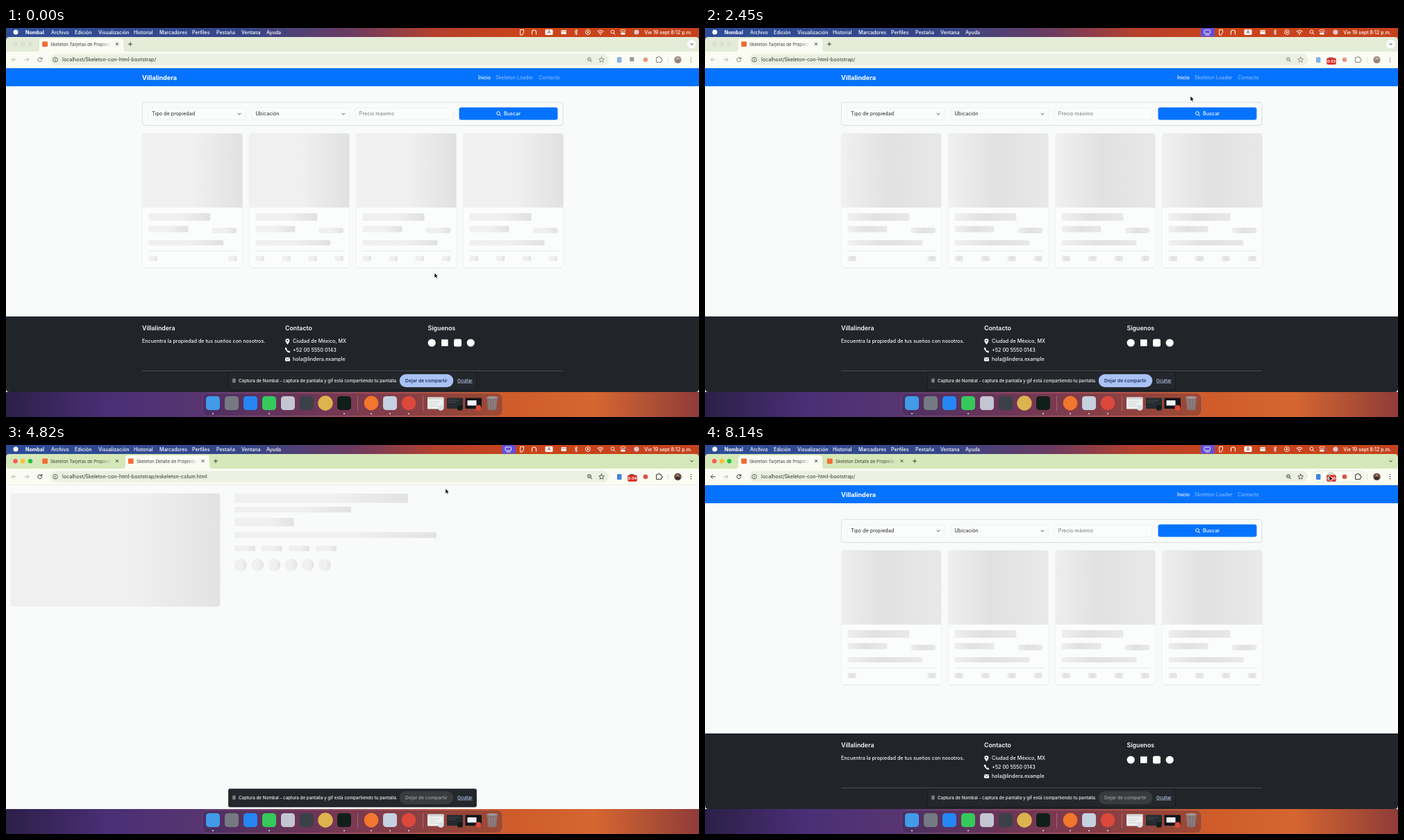
An HTML page that plays this animation: 998x561 px, repeating every 8240 ms.

```html
<!DOCTYPE html>
<html lang="es">
<head>
<meta charset="utf-8">
<title>Skeleton Tarjetas</title>
<style>
html, body { margin: 0; width: 100%; height: 100%; overflow: hidden; background: #212529 }
svg { display: block; width: 998px; height: 561px; font-family: Inter, "Liberation Sans", sans-serif }
text { white-space: pre }
</style>
</head>
<body>
<svg id="stage" viewBox="0 0 998 561" xmlns="http://www.w3.org/2000/svg"></svg>
<script>
const LOOP = 8240, BRAND = 'Villalindera', BROWSER = 'Nombal';
const ORANGE = '#f26c32', INK = '#24282c', BLUE = '#0573ff';

// Markup helpers
const rect = (x, y, w, h, fill, r = 0, more = '') =>
  `<rect x="${x}" y="${y}" width="${w}" height="${h}" rx="${r}" fill="${fill}" ${more}/>`;
const disc = (x, y, r, fill, more = '') => `<circle cx="${x}" cy="${y}" r="${r}" fill="${fill}" ${more}/>`;
const line = (d, color, w = 1, more = '') =>
  `<path d="${d}" fill="none" stroke="${color}" stroke-width="${w}" stroke-linecap="round" stroke-linejoin="round" ${more}/>`;
const text = (x, y, s, size, fill, weight = 400, more = '') =>
  `<text x="${x}" y="${y}" font-size="${size}" fill="${fill}" font-weight="${weight}" ${more}>${s}</text>`;
const group = (id, ...parts) => `<g id="${id}">${parts.join('')}</g>`;
const each = (list, f) => list.map(f).join('');
const range = n => [...Array(n).keys()];
const gradient = (id, stops, more = '') => `<linearGradient id="${id}" ${more}>` +
  each(stops, ([o, c, a = 1]) => `<stop offset="${o}" stop-color="${c}" stop-opacity="${a}"/>`) + '</linearGradient>';
const bone = (x, y, w, h, r = 2) => rect(x, y, w, h, 'url(#shimmer)', r);
const lens = (x, y, color) => disc(x, y, 2.4, 'none', `stroke="${color}" stroke-width=".9"`) +
  line(`M${x + 1.8} ${y + 1.8}l2 2`, color, .9);
const cross = x => line(`M${x - 1.7} 21.4l3.4 3.4m0-3.4l-3.4 3.4`, '#333', .9);
const plus = x => line(`M${x - 2.5} 23.2h5m-2.5-2.5v5`, '#333', .9);

const defs = '<defs>' +
  gradient('shimmer', [[.25, '#f0f0f0'], [.37, '#e0e1e0'], [.63, '#f0f0f0']], 'x1="0" x2="4" y1="0" y2="0"') +
  gradient('fade', [[.84, '#3b3f38'], [1, '#3b3f38', .1]]) +
  gradient('menu', [[0, '#2d4d98'], [.35, '#364688'], [.5, '#6c3b60'], [.62, '#b4402d'], [.75, '#cb4419'], [1, '#c4421d']]) +
  gradient('desk', [[0, '#2b2048'], [.15, '#4a2f76'], [.28, '#583570'], [.5, '#9a4453'],
    [.7, '#cd5a29'], [.85, '#d56630'], [1, '#8f3c3a']]) +
  '</defs>';

function menuBar() {
  const names = [['Archivo', 65], ['Edición', 99], ['Visualización', 133], ['Historial', 184], ['Marcadores', 221],
    ['Perfiles', 268], ['Pestaña', 303], ['Ventana', 339], ['Ayuda', 375]];
  const w = '#fff';
  return rect(0, 0, 998, 20, 'url(#menu)') + disc(14, 6, 3.5, w) + text(28, 8.5, BROWSER, 7.1, w, 700) +
    each(names, ([s, x]) => text(x, 8.5, s, 7, w, 500)) +
    group('rec', rect(714, 0, 20, 12.5, '#6250d8', 2),
      rect(719, 3, 8.5, 5, 'none', .8, 'stroke="#fff" stroke-width=".9"'), line('M721 10h5', w, .9), disc(895.5, 6, 1, '#8b5cf6')) +
    line('M741 2.5h4.5v4l-2 3.5h-2.5z', w) +
    line('M757.5 8V6a3 3 0 0 1 6 0v2m-6-1v2m6-2v2', w, 1.1) +
    rect(776.5, 2, 11, 8, w, 1.5) + text(782, 8.4, 'A', 6.3, '#9c4630', 600, 'text-anchor="middle"') +
    rect(799.5, 3, 7.5, 6, w, .8) + line('M800 5h6.5', '#b4402d', .7) +
    line('M819 4l4 4-2 2V2l2 2-4 4', w, .8) +
    disc(838, 6, 3.4, 'none', 'stroke="#fff" stroke-width=".9"') + '<path d="M837 4.3v3.4l2.8-1.7z" fill="#fff"/>' +
    line('M852.3 5a5.5 5.5 0 0 1 7.6 0m-6 2a3.2 3.2 0 0 1 4.4 0', w, 1.1) + disc(856.1, 9, .9, w) +
    lens(873.5, 5.5, w) +
    rect(885, 2.5, 7, 2.8, 'none', 1.4, 'stroke="#fff" stroke-width=".8"') + rect(885, 6.7, 7, 2.8, w, 1.4) +
    disc(908, 6, 3.6, '#e3c5d0') +
    text(988, 8.5, 'Vie 19 sept 8:12 p.m.', 7, w, 500, 'text-anchor="end"');
}

const tabShape = (id, x) => group(id,
  `<path d="M${x - 4} 34q4 0 4-4V19q0-4 4-4h113q4 0 4 4v11q0 4 4 4z" fill="#fafcf3"/>`);
const tabText = (x, title) => text(x, 25.6, title, 6.3, 'url(#fade)');

function browser() {
  const soft = '#535950';
  return '<path id="strip" d="M0 34V18q0-5 5-5H993q5 0 5 5V34z"/>' +
    group('lights', each([13.5, 24.3, 35], (x, i) => disc(x, 23.2, 3.2, ['#fb5a52', '#fdbc2e', '#29c440'][i]))) +
    group('dimLights', each([13.5, 24.3, 35], x => disc(x, 23.2, 3.1, '#dde2d4', 'stroke="#cfd5c6" stroke-width=".5"'))) +
    tabShape('front1', 48) + rect(52.2, 19.5, 7.8, 7.6, ORANGE, 1) +
    tabText(64, 'Skeleton Tarjetas de Propied') + cross(160) +
    group('plus1', plus(179)) +
    group('tab2', tabShape('front2', 172), group('icon2', rect(175.8, 19.5, 7.8, 7.6, ORANGE, 1)),
      group('wait2', disc(179.7, 23.2, 2.3, 'none', 'stroke="#a3aa9a" stroke-width="1"')),
      tabText(188, 'Skeleton Detalle de Propieda'), cross(283.5), plus(302)) +
    disc(987.5, 23.2, 6.2, '#fff', 'id="round"') + line('M985.8 22.5l1.8 1.7 1.8-1.7', '#222', 1) +
    rect(0, 34, 998, 24, '#fafcf3') + rect(0, 57.4, 998, .6, '#e3e8db') +
    rect(64, 37.6, 804, 16, '#ebf0e1', 8) +
    group('back', line('M14.5 45.7H8.5m2.7-2.8l-2.8 2.8 2.8 2.8', '#444', 1)) +
    line('M27 45.7h6m-2.7-2.8l2.8 2.8-2.8 2.8', '#b6bbb0', 1) +
    group('tools',
      line('M51.5 44.2a3 3 0 1 0 .3 2.2m0-4v2.2h-2.2', '#333', 1),
      lens(840, 45, '#333'), line('M839 45h2', '#333', .7),
      line('M857.7 42l1.1 2.5 2.7.2-2 1.8.6 2.7-2.4-1.4-2.4 1.4.6-2.7-2-1.8 2.7-.2z', '#333', .8),
      rect(880, 42, 6.5, 8, '#4283dd', 1),
      rect(898.3, 42, 6, 6, '#555a55', .5), disc(921, 45.7, 3.3, '#d95140'),
      line('M937 43h2q0-2 1.3-2t1.3 2h2v2.3q2 0 2 1.2t-2 1.2v2h-6.6z', '#333', 1, 'transform="translate(0 -.3)"'),
      line('M953.5 42v7.5', '#cfd8c0', .8),
      disc(967.5, 45.7, 5.3, '#6d5148'), disc(967.5, 44, 1.8, '#a77b62'), rect(964.3, 46.3, 6.4, 3.2, '#33282a', 1.6),
      each([42.8, 45.7, 48.6], y => disc(986.5, y, .8, '#333'))) +
    group('hover', rect(875, 37.6, 75, 16, 'none', 8, 'stroke="#dce3d1" stroke-width=".8"'), disc(901.5, 45.7, 7, '#d9ddd2')) +
    group('badge', rect(895.3, 43.3, 13.6, 9.5, '#db2f27', 2), text(902.1, 50, '', 5.3, '#fff', 700, 'id="timer" text-anchor="middle"')) +
    disc(71, 45.7, 3.3, 'none', `stroke="${soft}" stroke-width=".9"`) + line('M71 45.4v1.9', soft, .9) + disc(71, 43.9, .5, soft) +
    text(81, 48.2, '', 7.2, '#2f332d', 400, 'id="url"');
}

function card(i) {
  const x = 196.3 + i * 154.1, l = x + 9;
  const spots = i ? [0, 38, 76, 114] : [0, 115];
  return rect(x - .3, 152, 144.4, 194, '#fbfcfc', 4, 'stroke="#edf0ef" stroke-width=".7"') +
    line(`M${x + 3} 346.2h138`, '#e6e9e8', 1) +
    `<path d="M${x} 259V156q0-4 4-4h136q4 0 4 4v103z" fill="url(#shimmer)"/>` +
    bone(l, 267, 89, 11) + bone(l, 285.5, 57, 9) + bone(x + 100, 288, 36, 8, 4) + bone(l, 306, 108, 7.5) +
    rect(l, 321, 128, .7, '#dfe2e2') + each(spots, s => bone(l + s, 328.7, 12.5, 7.5));
}

function home() {
  const white = '#f6f7f8';
  const field = (x, s, color) => rect(x, 115, 140.5, 17.3, '#fbfcfc', 3, 'stroke="#eaedef" stroke-width=".7"') +
    text(x + 5.5, 126.2, s, 7.2, color);
  const chevron = x => line(`M${x - 2} 123l2 2 2-2`, '#444', .9);
  return group('home', rect(0, 58, 998, 467, '#f9fbfa'),
    rect(0, 58, 998, 26, BLUE), text(196, 74.7, BRAND, 9.1, '#fff', 700),
    text(680, 73.8, 'Inicio', 7.1, '#fff', 500),
    text(705, 73.8, 'Skeleton Loader', 7.1, '#fff', 400, 'id="link"'),
    text(767.3, 73.8, 'Contacto', 7.1, '#fff', 400, 'fill-opacity=".58"'),
    rect(196.5, 108.3, 606, 33, '#e7eaeb', 4), rect(196.3, 107.3, 605.6, 33, '#fafcfb', 4, 'stroke="#d9dddf" stroke-width=".8"'),
    field(204.5, 'Tipo de propiedad', INK), chevron(336), field(354, 'Ubicación', INK), chevron(486),
    field(503.3, 'Precio máximo', '#70777d'),
    rect(652.5, 114.6, 142, 18, BLUE, 3), lens(709, 123, '#fff'), text(717, 126.2, 'Buscar', 7.2, '#fff', 500),
    each(range(4), card),
    '<path d="M0 416H998V520q0 5-5 5H5q-5 0-5-5z" fill="#212529"/>',
    each([[196, BRAND], [402, 'Contacto'], [607.5, 'Síguenos']], ([x, s]) => text(x, 436.4, s, 8.8, white, 600)),
    text(196, 454.4, 'Encuentra la propiedad de tus sueños con nosotros.', 7.15, white, 500),
    each(['Ciudad de México, MX', '+52 00 5550 0143', 'hola@lindera.example'], (s, i) => text(413, 454.4 + i * 13, s, 7.15, white, 500)),
    '<path d="M405.4 456.4q-3-3.8-3-5.4a3 3 0 0 1 6 0q0 1.6-3 5.4" fill="#fff"/>', disc(405.4, 451, 1.1, '#212529'),
    line('M403.2 462.3q.8 4 4.4 5', '#fff', 1.5), line('M403 462l.6 1.5m2.6 2.8l1.8.8', '#fff', 2.2),
    rect(402, 475.1, 7, 5.4, '#fff', .8), line('M402.5 475.9l3 2.3 3-2.3', '#212529', .7),
    disc(613.2, 454, 5.6, '#fff'), rect(627, 449.2, 9.6, 9.6, '#fff'),
    rect(645, 448.5, 11, 11, '#fff', 2.5), disc(669.2, 454, 5.6, '#fff'),
    rect(196, 494, 606, .8, '#51565a'));
}

function detail() {
  const bars = [[70, 250, 13.5], [89, 168, 8.3], [105.3, 85.5, 12], [125.7, 291, 8.3]];
  return group('detail', rect(0, 58, 998, 467, '#f9fbf3', 0, 'id="page"'),
    group('bones', bone(6.3, 69.7, 302, 163.5, 4),
      each(bars, ([y, w, h]) => bone(329, y, w, h, 1.5)),
      each(range(4), i => bone(329 + i * 39, 145.3, 30, 8, 1.5)),
      each(range(6), i => bone(329 + i * 24.2, 164, 18, 18, 9))));
}

const shareBar = () => rect(320.5, 496, 357, 26, '#24272b', 2, 'stroke="#15171a" stroke-width=".7"') +
  line('M327.2 506v5m2.4-5v5', '#e8e8e8', 1) +
  text(335, 510.7, `Captura de ${BROWSER} - captura de pantalla y gif está compartiendo tu pantalla.`, 6.25, '#f2f2f2', 500) +
  rect(566.7, 499.3, 77.6, 18.6, '', 9.3, 'id="stop"') +
  text(605.4, 511, 'Dejar de compartir', 6.75, '', 600, 'id="stopText" text-anchor="middle"') +
  text(650, 510.7, 'Ocultar', 6.2, '#b9cdf4', 500, 'text-decoration="underline"');

function dock() {
  const app = (x, c) => rect(x - 10, 531, 20, 20, c, 4.6);
  const apps = ['#429be8', '#747982', '#2586f4', '#35c95c', '#c3c6d0', '#3b4148'];
  return rect(0, 515, 998, 46, 'url(#desk)') +
    rect(283, 526.5, 432, 33, '#31204a', 8, 'fill-opacity=".3" stroke="#fff" stroke-opacity=".16" stroke-width=".7"') +
    each(apps, (c, i) => app(298 + i * 27, c)) + disc(460, 541, 10.7, '#ddb34f') + app(487, '#101f1a') +
    disc(526, 541, 10.4, '#f2762d') + app(553, '#c5d1df') + disc(580, 541, 10.2, '#dc493b') +
    each([506.5, 600.5], x => line(`M${x} 531v21`, '#fff', .6, 'opacity=".4"')) +
    rect(607, 532.5, 23.5, 17, '#eef0ef', 1) + rect(607, 532.5, 23.5, 3, '#cfd4d3', 1) +
    line('M610 539h14m-14 3h10m-10 3h12', '#c2c6cb', .7) + disc(626.2, 547.7, 4, '#d6e0e8') +
    rect(635, 533.5, 23, 15.5, '#262b30', 1) + line('M637 537h15m-15 3h10', '#555d63', .7) + rect(650, 544, 7.5, 7.5, '#101f1a', 1.5) +
    rect(661.5, 533.5, 23.5, 15.5, '#11151d', 1) + rect(664.5, 537, 13, 7.5, '#f0f1f3') + disc(680.5, 547.7, 4, '#dc493b') +
    '<path d="M692.5 532.5h15.5l-1.8 18q-6 1.8-12 0z" fill="#817b80" fill-opacity=".85"/>' +
    `<ellipse cx="700.2" cy="532.8" rx="7.8" ry="1.8" fill="#a19698"/>` +
    line('M696 537l.7 11m3.5-11v11m4.2-11l-.7 11', '#b0a6a9', .6, 'opacity=".6"') +
    each([298, 379, 487, 526, 553, 580], x => disc(x, 556.2, 1, '#e9e2e6'));
}

stage.innerHTML = defs + dock() + menuBar() + detail() + home() + browser() + shareBar() +
  '<path id="cursor" d="M0 0V7.6L1.8 6 3 8.7 4.3 8.1 3.1 5.5H5.5Z" fill="#000" stroke="#fff" stroke-width=".7"/>';

const $ = id => document.getElementById(id);
const show = (id, on) => { $(id).style.display = on ? '' : 'none'; };
const paint = (id, color) => $(id).setAttribute('fill', color);

// Interpolates rows of [time, ...values]
function track(keys, t, ease = k => k) {
  const i = Math.max(1, keys.findIndex(k => k[0] > t)), a = keys[i - 1], b = keys[i];
  const k = ease((t - a[0]) / (b[0] - a[0]));
  return a.slice(1).map((v, j) => v + (b[j + 1] - v) * k);
}
const smooth = k => k * k * (3 - 2 * k);

// CSS "ease": cubic-bezier(.25, .1, .25, 1)
function cssEase(x) {
  let lo = 0, hi = 1, s;
  for (let i = 0; i < 18; i++) {
    s = (lo + hi) / 2;
    const bx = .75 * s * (1 - s) ** 2 + .75 * s * s * (1 - s) + s ** 3;
    if (bx < x) lo = s; else hi = s;
  }
  return .3 * s * (1 - s) ** 2 + 3 * s * s * (1 - s) + s ** 3;
}

const pointer = [[0, 617, 353], [600, 617, 353], [1580, 607, 105], [2450, 699, 98], [2950, 731, 69.5], [4500, 731, 69.5],
  [5680, 191, 32.5], [6200, 125, 21], [7000, 125, 21], [8000, 899, 44], [LOOP, 899, 44]];
const sweep = [[0, .54], [1580, 1.59], [2450, 2.39], [6980, 5.53], [LOOP, 6.45]];
const ticks = [1000, 1900, 2400, 3400, 5000, 5900, 6700, 7800];

function frame() {
  const t = performance.now() % LOOP;
  const rec = t >= 1000, focus = t >= 3000, two = t >= 3500, loaded = t >= 4500;
  const second = two && t < 6500;
  const flags = { rec, badge: rec, lights: focus, dimLights: !focus, round: !focus, front1: !second, front2: second,
    plus1: !two, tab2: two, icon2: loaded, wait2: !loaded, home: !second, detail: second, bones: loaded, hover: t >= 7850 };
  for (const id in flags) show(id, flags[id]);

  paint('strip', focus ? '#d5e8b9' : '#e4ebd7');
  paint('page', loaded ? '#f9fbfa' : '#f9fcf2');
  paint('stop', focus ? '#393b3e' : '#a9c2f5');
  paint('stopText', focus ? '#96989a' : '#1d3768');
  $('tools').style.opacity = focus ? 1 : .6;
  $('back').style.opacity = focus && !second ? 1 : .35;
  $('link').style.fillOpacity = t >= 2800 && t < 7600 ? .88 : .58;
  $('url').textContent = 'localhost/Skeleton-con-html-bootstrap/' + (second ? 'eskeleton-colum.html' : '');
  $('timer').textContent = '0:0' + ticks.filter(s => t >= s).length;

  const [phase] = track(sweep, t);
  const shift = -3 * (1 - cssEase((phase + (second ? .53 : 0)) % 1));
  $('shimmer').setAttribute('gradientTransform', `translate(${shift} 0)`);
  $('cursor').setAttribute('transform', `translate(${track(pointer, t, smooth)})`);
  requestAnimationFrame(frame);
}
frame();
</script>
</body>
</html>
```
